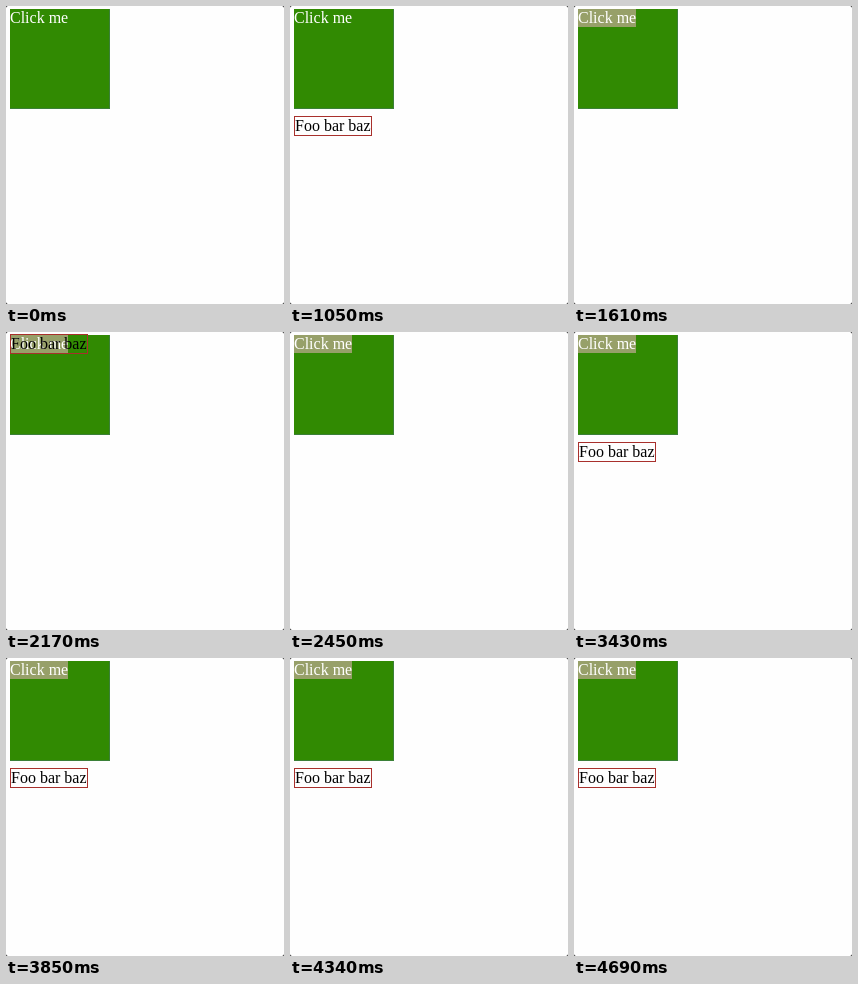
Recreate the animation shown at these times as an HTML page. Size 278 by 298 pixels, loop 5.46 s.

```html
<!DOCTYPE html>
<html lang="en">
<head>
<meta charset="utf-8">
<title>Toggle demo</title>
<style>
  html, body {
    margin: 0;
    width: 100%;
    height: 100%;
    overflow: hidden;
    background: #000;
  }
  #page {
    position: absolute;
    inset: 0;
    border-radius: 2px;
    background: #fefefe;
    font: 16px/18px "Liberation Serif", Times, serif;
    white-space: nowrap;
  }
  #page > div { position: absolute; left: 4px; }
  #button {
    top: 3px;
    width: 100px;
    height: 100px;
    background: #318a02;
    box-shadow: inset -1px -1px #3b8038;
    color: #fff;
  }
  #label { position: relative; display: inline-block; vertical-align: top; }
  #mark { position: absolute; inset: 0; background: #97a069; }
  #label b { position: relative; font-weight: normal; }
  #note {
    top: 110px;
    border: 1px solid #a8302c;
    color: #000;
  }
</style>
</head>
<body>
<div id="page">
  <div id="button"><span id="label"><span id="mark"></span><b>Click me</b></span></div>
  <div id="note">Foo bar baz</div>
</div>
<script>
  const LOOP = 5460;
  const hidden = { opacity: 0, transform: 'none' };
  const below = { opacity: 1, transform: 'none' };
  const onTop = { opacity: 1, transform: 'translateY(-108px)' };

  // Each step is [start in ms, state]; states hold until the next step.
  function play(id, steps) {
    const frames = steps.map(([time, state]) =>
      ({ ...state, offset: time / LOOP, easing: 'step-end' }));
    frames.push({ ...steps[steps.length - 1][1], offset: 1 });
    const anim = document.getElementById(id)
      .animate(frames, { duration: LOOP, iterations: Infinity });
    anim.startTime = 0;
  }

  play('mark', [[0, { opacity: 0 }], [1260, { opacity: 1 }]]);

  play('note', [
    [0, hidden],
    [1050, below], [1120, hidden],
    [1400, below], [1610, hidden],
    [1820, below], [1960, hidden],
    [2170, onTop], [2240, below], [2450, hidden],
    [2660, below], [2870, hidden],
    [3010, onTop], [3080, below], [3220, hidden],
    [3430, below], [3640, hidden],
    [3850, below], [4130, hidden],
    [4340, below], [4550, hidden],
    [4690, below]
  ]);
</script>
</body>
</html>
```
